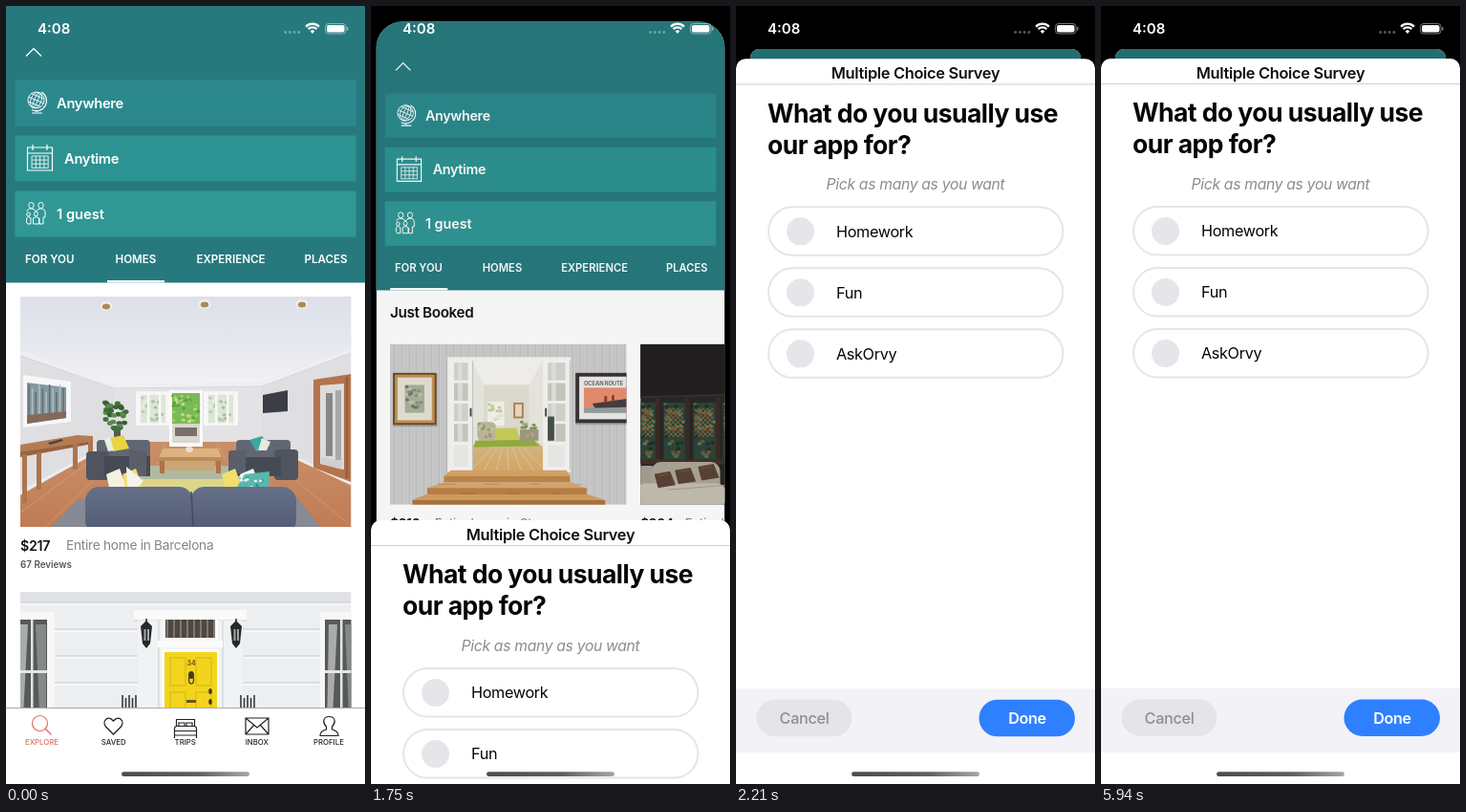
Recreate the animation shown at these times as an HTML page with a canvas. Size 376 px wide and 814 px high, loop 5980 ms.

```html
<!DOCTYPE html>
<html lang="en">
<head>
<meta charset="utf-8">
<title>Survey sheet</title>
<style>
html, body { margin: 0; width: 100%; height: 100%; overflow: hidden; background: #000; }
canvas { display: block; width: 376px; height: 814px; }
</style>
</head>
<body>
<canvas id="stage"></canvas>
<script>
const W = 376, H = 814, LOOP = 5980;
const TAB_TIME = 800, SHEET_TIME = 1684, SETTLED = 2190, SHEET_TOP = 55;
const canvas = document.getElementById('stage');
const ctx = canvas.getContext('2d');
const dpr = window.devicePixelRatio || 1;
canvas.width = W * dpr;
canvas.height = H * dpr;

const mix = (a, b, p) => a + (b - a) * p;
const clamp = v => Math.max(0, Math.min(1, v));

function rect(x, y, w, h, fill) {
  ctx.fillStyle = fill;
  ctx.fillRect(x, y, w, h);
}

function poly(fill, ...p) {
  ctx.beginPath();
  for (let i = 0; i < p.length; i += 2) ctx.lineTo(p[i], p[i + 1]);
  ctx.closePath();
  ctx.fillStyle = fill;
  ctx.fill();
}

function line(color, width, ...p) {
  ctx.beginPath();
  for (let i = 0; i < p.length; i += 2) ctx.lineTo(p[i], p[i + 1]);
  ctx.strokeStyle = color;
  ctx.lineWidth = width;
  ctx.stroke();
}

function oval(x, y, rx, ry, fill) {
  ctx.beginPath();
  ctx.ellipse(x, y, rx, ry, 0, 0, Math.PI * 2);
  ctx.fillStyle = fill;
  ctx.fill();
}

function ring(x, y, rx, ry, color, width = 1, tilt = 0) {
  ctx.beginPath();
  ctx.ellipse(x, y, rx, ry, tilt, 0, Math.PI * 2);
  ctx.strokeStyle = color;
  ctx.lineWidth = width;
  ctx.stroke();
}

function round(x, y, w, h, r, fill) {
  ctx.beginPath();
  ctx.roundRect(x, y, w, h, r);
  ctx.fillStyle = fill;
  ctx.fill();
}

function path(d, color, width) {
  ctx.strokeStyle = color;
  ctx.lineWidth = width;
  ctx.stroke(new Path2D(d));
}

function shade(y0, y1, ...colors) {
  const g = ctx.createLinearGradient(0, y0, 0, y1);
  colors.forEach((c, i) => g.addColorStop(i / (colors.length - 1), c));
  return g;
}

// y is the middle of the capitals
function text(s, x, y, size, weight, color, align = 'left', track = -0.02) {
  ctx.font = `${weight} ${size}px Inter, "Liberation Sans", sans-serif`;
  ctx.letterSpacing = size * track + 'px';
  ctx.textAlign = align;
  ctx.fillStyle = color;
  ctx.fillText(s, x, y + size * 0.364);
}

function photo(x, y, w, h, draw) {
  ctx.save();
  ctx.translate(x, y);
  ctx.beginPath();
  ctx.rect(0, 0, w, h);
  ctx.clip();
  draw(w, h);
  ctx.restore();
}

function leaves(x, y, w, h, n, colors, size = 2) {
  for (let i = 0; i < n; i++) {
    const a = Math.sin(i * 12.99) * 43758.5, b = Math.sin(i * 78.23) * 12543.7;
    oval(x + (a - Math.floor(a)) * w, y + (b - Math.floor(b)) * h, size, size * 0.8, colors[i % colors.length]);
  }
}

// Photos, each in its own coordinates

function lounge(w, h) {
  rect(0, 0, w, h, '#dfdee1');
  poly(shade(0, 95, '#dee0e9', '#e6e8ef', '#f2f2f5'), 0, 0, w, 0, w, 54, 253, 90, 98, 92, 0, 57);
  rect(98, 92, 155, 64, '#e3e2e4');
  line('#efeff3', 4, 0, 59, 98, 94, 253, 92, w, 56);
  line('#d3d3d8', 0.8, 0, 62, 98, 96, 253, 94, w, 59);
  for (const [x, y] of [[90, 10], [193, 8], [295, 8]]) {
    oval(x, y, 6, 4.5, '#f8f3e6');
    oval(x, y + 0.5, 4.2, 3, '#a98a5d');
  }
  poly(shade(152, h, '#c98f69', '#c07c54'), 0, 208, 98, 152, 253, 152, w, 196, w, h, 0, h);
  for (let i = 0; i < 9; i++) line('rgba(232,175,135,.45)', 1, 98 + i * 18, 154, i * 46 - 20, h);
  line('#ececee', 3, 0, 205, 98, 152);
  line('#ececee', 3, 253, 152, w, 196);
  for (const x of [122, 193]) {
    rect(x - 1, 99, 36, 36, '#f4f4f4');
    rect(x + 4, 103, 26, 29, '#dde5d6');
    leaves(x + 6, 106, 22, 24, 22, ['#bccfac', '#e6ece1', '#a9bf9e']);
    for (const d of [0, 11, 23, 32]) rect(x + d, 100, 2.5, 35, '#f8f8f8');
  }
  rect(156, 98, 35, 59, '#fafafa');
  rect(159, 101, 29, 34, '#7ab956');
  leaves(160, 104, 27, 28, 46, ['#5ca046', '#9bd25f', '#80bc54', '#c0df8c']);
  rect(159, 133, 29, 20, '#dad7d1');
  rect(162, 137, 23, 9, '#77716a');
  poly('#f7f7f9', 3, 82, 53, 89, 53, 131, 3, 137);
  poly('#8298a3', 7, 90, 48, 95, 48, 127, 7, 133);
  for (let i = 0; i < 11; i++) line(i % 2 ? '#b0c1c6' : '#6d675f', 1.4, 9 + i * 3.6, 92 + i % 3 * 4, 9 + i * 3.6, 126);
  poly('#826b58', 7, 124, 48, 120, 48, 127, 7, 133);
  poly('#b47c50', 0, 155, 60, 145, 76, 146, 76, 151, 0, 164);
  poly('#966240', 0, 163, 76, 151, 76, 154, 0, 168);
  for (const [x, y, e] of [[2, 165, 216], [17, 163, 202], [55, 154, 181], [71, 152, 179]]) rect(x, y, 5, e - y, '#ad7550');
  poly('#4b4441', 29, 153, 43, 149, 45, 151, 31, 155);
  rect(98, 135, 7, 15, '#5c5754');
  leaves(89, 111, 22, 29, 34, ['#416f3c', '#5b8c4f', '#345f32'], 3);
  poly('#3c3e45', 254, 103, 280, 98, 280, 120, 254, 122);
  poly('#b4744c', 307, 87, w, 81, w, 194, 307, 179);
  poly('#dcdcdb', 314, 93, 339, 91, 339, 181, 314, 175);
  rect(320, 101, 7, 66, '#858889');
  rect(330, 98, 6, 73, '#a6a9aa');
  line('#96603f', 3, 342, 84, 342, 190);
  poly('#cfd0ce', 315, 175, 337, 181, 337, 172, 315, 168);

  const dark = '#50545f';
  poly('#b0b99f', 136, 177, 217, 177, 245, 202, 110, 202);
  round(80, 150, 56, 27, 4, '#626672');
  round(69, 162, 24, 30, 4, dark);
  rect(88, 167, 48, 21, '#464a55');
  round(114, 161, 18, 27, 3, '#5b5f6a');
  round(226, 150, 57, 27, 4, '#626672');
  round(266, 160, 25, 32, 4, dark);
  rect(225, 168, 48, 20, '#464a55');
  round(218, 161, 18, 24, 3, '#5b5f6a');
  poly('#ead43f', 93, 148, 108, 145, 114, 159, 97, 162);
  poly('#e7eee4', 88, 150, 94, 147, 98, 161, 92, 162);
  poly('#3aa8a0', 240, 150, 253, 146, 262, 156, 247, 162);
  poly('#e6eadb', 253, 148, 262, 152, 258, 161, 249, 161);
  poly('#dcb380', 149, 159, 207, 159, 211, 169, 145, 169);
  rect(145, 168, 66, 5, '#be8a58');
  for (const x of [146, 205]) rect(x, 172, 5, 13, '#a97549');
  rect(151, 172, 53, 10, '#cba678');
  oval(177, 160, 4, 3, '#e6dfd6');
  poly('#858a95', 61, 212, 288, 208, 314, h, 33, h);
  round(99, 191, 151, 18, 7, '#ddd68a');
  for (const [x, c] of [[90, '#f4f1de'], [107, '#efdf6d'], [211, '#efdf6d'], [230, '#effaf5']]) {
    poly(c, x, 186, x + 14, 180, x + 22, 202, x + 4, 204);
  }
  poly('#f5f4ec', 111, 178, 129, 193, 121, 202, 112, 198);
  poly('#58b8ae', 235, 186, 261, 183, 260, 201, 224, 204);
  leaves(231, 188, 25, 12, 13, ['#e6f2e8', '#34988f'], 1.7);
  const cloth = shade(198, h, '#667089', '#545e76');
  round(68, 199, 113, 50, 15, cloth);
  round(178, 199, 111, 50, 15, cloth);
  line('#434c63', 1.5, 179, 204, 181, h);
}

function facade(w, h) {
  rect(0, 0, w, h, '#edeef0');
  rect(0, 0, w, 11, '#e0e2e5');
  for (let y = 11; y < h; y += 28) {
    line('#cbced2', 1.2, 0, y, w, y);
    line('#f8f9fa', 1.5, 0, y + 2, w, y + 2);
  }
  for (const x of [-10, 314]) {
    rect(x, 21, 46, h, '#f7f7f7');
    rect(x + 5, 29, 33, h, '#565a5b');
    poly('#a9acab', x + 9, 34, x + 18, 34, x + 12, h, x + 7, h);
    poly('#858989', x + 26, 34, x + 37, 34, x + 37, h, x + 31, h);
    rect(x + 21, 29, 2.5, h, '#e4e5e4');
    rect(x + 5, 82, 33, 3, '#e4e5e4');
  }
  rect(119, 19, 118, 11, '#fafafa');
  line('#c6c9cd', 1, 119, 30, 237, 30);
  rect(123, 30, 110, h, '#f1f2f3');
  line('#cbced1', 1, 145, 30, 145, h);
  line('#cbced1', 1, 212, 30, 212, h);
  rect(149, 27, 58, 24, '#fafafa');
  rect(152, 29, 52, 19, '#4e4843');
  for (let i = 0; i < 8; i++) line('#b1a69b', 1, 154 + i * 7, 29, 154 + i * 7, 48);
  rect(144, 51, 68, 7, '#fbfbfb');
  rect(148, 60, 60, h, '#fdfdfd');
  rect(151, 63, 55, h, '#f2d41c');
  ctx.strokeStyle = '#d9ba1a';
  ctx.lineWidth = 1.2;
  for (const x of [157, 184]) {
    ctx.strokeRect(x, 69, 16, 29);
    ctx.strokeRect(x, 105, 16, 40);
  }
  text('34', 179, 74, 7, 600, '#5d4b13', 'center', 0);
  oval(179, 87, 3, 4, '#493c20');
  ring(179, 92, 2.5, 4, '#493c20', 1.3);
  rect(174, 113, 10, 3, '#6a5415');
  oval(199, 104, 1.8, 3, '#493c20');
  oval(199, 115, 1.8, 3, '#493c20');
  for (const x of [132, 226]) {
    line('#26282a', 1.5, x, 28, x, 34);
    poly('#26282a', x - 6, 36, x, 30, x + 6, 36, x + 4, 54, x, 59, x - 4, 54);
    rect(x - 2.5, 39, 2, 12, '#a4a7a8');
    rect(x + 1, 39, 2, 12, '#a4a7a8');
  }
  for (const x of [107, 231]) for (let i = 0; i < 5; i++) line('#35383a', 1.6, x + i * 3.5, 108 + i % 2 * 3, x + i * 3.5, h);
}

function hall(w, h) {
  rect(0, 0, w, h, '#cecdcd');
  for (let x = 5; x < w; x += 8) {
    line('#bdbcbd', 0.8, x, 0, x, h);
    line('#d7d6d6', 0.8, x + 1.2, 0, x + 1.2, h);
  }
  rect(62, 14, 133, 124, '#f6f6f4');
  rect(88, 17, 77, 120, '#ecebe4');
  poly('#f7f6f2', 88, 17, 165, 17, 150, 44, 101, 44);
  rect(101, 44, 49, 55, '#e4e1d4');
  rect(105, 62, 18, 26, '#f8f8ef');
  leaves(107, 65, 14, 17, 18, ['#c4d2a6', '#e6ebd2']);
  rect(133, 63, 11, 17, '#b3855b');
  rect(135, 65, 7, 13, '#ede1c2');
  poly(shade(98, 138, '#dcc18f', '#d9ac6c'), 88, 111, 101, 98, 150, 98, 165, 111, 165, 138, 88, 138);
  for (let i = 0; i < 7; i++) line('rgba(244,218,168,.6)', 1, 117 + i * 3, 103, 86 + i * 14, 138);
  poly('#93b33f', 92, 104, 154, 103, 161, 110, 90, 111);
  round(94, 84, 20, 20, 5, '#bfbb9e');
  leaves(96, 86, 17, 15, 14, ['#8ca66a', '#d4cb9f', '#a7997a'], 1.8);
  poly('#c9d25c', 114, 91, 137, 90, 139, 102, 114, 103);
  rect(140, 92, 20, 12, '#a29c83');
  leaves(142, 84, 17, 16, 16, ['#7d9658', '#b1ae87']);
  for (const [x, pw] of [[64, 25], [165, 29]]) {
    rect(x, 16, pw, 121, '#f8f8f7');
    for (let i = 0; i < 4; i++) {
      rect(x + 5, 20 + i * 22, pw - 10, 19, i % 2 ? '#cbcbc2' : '#d6d6d0');
      rect(x + 9, 20 + i * 22, 5, 19, '#e4e4df');
    }
    rect(x + 5, 109, pw - 10, 23, '#eeeeec');
    line('#c6c6c3', 1, x + pw, 18, x + pw, 135);
  }
  rect(170, 78, 7, 26, '#4a534a');
  rect(86, 69, 2, 9, '#4f4a43');
  rect(167, 69, 2, 9, '#4f4a43');
  const wood = ['#d9a667', '#c2874a', '#dcaa6c', '#bd8145', '#d69f62'];
  poly(wood[0], 66, 136, 190, 136, 194, 142, 58, 142);
  rect(58, 142, 136, 7, wood[1]);
  poly(wood[2], 57, 149, 196, 149, 211, 155, 40, 155);
  rect(40, 155, 172, 7, wood[3]);
  poly(wood[4], 39, 162, 213, 162, 231, 168, 24, 168);
  rect(24, 168, 208, 6, '#b07640');
  for (let i = 0; i < 7; i++) line('rgba(115,67,28,.3)', 0.8, 51 + i * 25, 151 + i % 2 * 10, 70 + i * 23, 151 + i % 2 * 10);
  rect(3, 32, 48, 57, 'rgba(80,75,75,.3)');
  rect(3, 31, 47, 56, '#6e4b27');
  rect(5, 33, 43, 52, '#c49552');
  rect(8, 36, 37, 46, '#e9e3d6');
  rect(16, 44, 21, 30, '#a9b29b');
  leaves(18, 46, 17, 23, 24, ['#637e60', '#cfc6a8', '#88927e']);
  rect(200, 32, 56, 55, 'rgba(80,75,75,.3)');
  rect(200, 31, 56, 54, '#393437');
  rect(204, 35, 52, 46, '#eeece8');
  text('OCEAN ROUTE', 209, 42, 6, 700, '#6b676e');
  rect(209, 47, 46, 27, '#e99070');
  poly('#473e43', 218, 64, 255, 59, 255, 68, 221, 69);
  rect(231, 56, 3, 7, '#903f35');
  rect(239, 55, 3, 7, '#903f35');
  rect(209, 69, 46, 5, '#8aa5aa');
}

function cabin(w, h) {
  rect(0, 0, w, h, '#2a2626');
  poly('#221f20', 0, 0, w, 0, w, 51, 0, 58);
  line('#3b322e', 2, 0, 57, w, 51);
  for (const [x, ww] of [[0, 17], [25, 24], [57, 25], [89, 26]]) {
    rect(x, 63, ww, 62, '#2e4539');
    leaves(x + 2, 65, ww - 4, 57, 34, ['#4b6d4c', '#1e3029', '#5f7c66', '#6f5a38'], 2.2);
    ctx.save();
    ctx.beginPath();
    ctx.rect(x + 1, 67, ww - 4, 34);
    ctx.clip();
    for (let i = -20; i < ww + 20; i += 5) {
      line('#95683a', 1, x + i, 69, x + i + 31, 100);
      line('#95683a', 1, x + i + 31, 69, x + i, 100);
    }
    ctx.restore();
    rect(x + ww - 1, 58, 5, 74, '#3a2c27');
  }
  rect(0, 124, w, 5, '#40322a');
  round(-6, 131, 26, 30, 9, '#a79f92');
  round(12, 127, 74, 42, 10, '#aea698');
  round(-4, 150, 96, 26, 9, '#c6bfb2');
  for (const [x, y] of [[26, 146], [48, 142], [73, 138]]) {
    poly('#5b4436', x - 11, y - 6, x + 6, y - 9, x + 12, y + 6, x - 7, y + 9);
    line('#735846', 1, x - 7, y - 4, x + 4, y - 6);
  }
  line('#a39b8e', 1, 30, 157, 92, 152);
}

// App screen

function stars(x, y) {
  for (let s = 0; s < 5; s++) {
    ctx.beginPath();
    for (let i = 0; i < 10; i++) {
      const a = -Math.PI / 2 + i * Math.PI / 5, r = i % 2 ? 2.3 : 5.6;
      ctx.lineTo(x + 5.5 + s * 11.5 + Math.cos(a) * r, y + Math.sin(a) * r);
    }
    ctx.fillStyle = '#3ba7a0';
    ctx.fill();
  }
}

function caption(x, y, price, place) {
  text(price, x, y, 14.2, 600, '#111');
  text(place, x + 48, y, 13.7, 400, '#858585');
}

function reviews(s, x, y) {
  text(s, x, y, 9.8, 600, '#555', 'left', 0);
}

function homesPage() {
  photo(15, 304, 346.5, 241, lounge);
  caption(15, 564.5, '$217', 'Entire home in Barcelona');
  reviews('67 Reviews', 15, 584);
  photo(15, 613, 346.5, 150, facade);
}

function forYouPage() {
  text('Just Booked', 15, 313.5, 15.6, 600, '#111');
  text('Homes', 15, 603, 15.6, 600, '#111');
  for (const y of [347.5, 637]) {
    photo(15, y, 255, 173, hall);
    photo(285, y, 255, 173, cabin);
  }
  caption(15, 540.5, '$216', 'Entire home in Stavanger');
  caption(285, 540.5, '$204', 'Entire home in Lisbon');
  stars(15, 560);
  stars(285, 560);
  reviews('220 Reviews', 77, 560);
  reviews('181 Reviews', 347, 560);
}

function searchIcons() {
  const c = '#fff', tilt = 0.4;
  for (const r of [8.5, 5.5, 1.8]) ring(31.5, 98.5, r, 8.5, c, 0.9, tilt);
  for (const d of [-4.5, 0, 4.5]) {
    const half = Math.sqrt(72 - d * d), cos = Math.cos(tilt), sin = Math.sin(tilt);
    line(c, 0.9, 31.5 - half * cos - d * sin, 98.5 - half * sin + d * cos,
      31.5 + half * cos - d * sin, 98.5 + half * sin + d * cos);
  }
  path('M37 90 A10.5 10.5 0 0 1 27 108.5 M32 109 V111 M27 112 H38', c, 1.2);

  path('M22.5 148 H48.5 V172 H22.5 Z M22.5 154 H48.5 M28 145 V151 M43 145 V151', c, 1.2);
  for (let i = 0; i < 5; i++) line(c, 0.8, 27 + i * 4.3, 157, 27 + i * 4.3, 169.5);
  for (let i = 0; i < 4; i++) line(c, 0.8, 27, 157 + i * 4.1, 44.2, 157 + i * 4.1);

  ring(26.5, 208.5, 2.7, 3, c);
  ring(36.5, 208.5, 2.7, 3, c);
  ring(23.5, 218, 1.8, 2, c);
  ring(31.5, 217.5, 2, 2.2, c);
  path('M22 215 Q22 212 26.5 212 Q30 212 31.5 215 Q33 212 36.5 212 Q41 212 41 216 V221 H39 V228 H35 V222'
    + ' M21.5 226 V222 Q23.5 219 26 222 V228 H22.5 Z M28.5 228 V222 Q31.5 219 34.5 222 V228 Z', c, 1);
}

function tabBar() {
  rect(0, 734, W, 80, '#fff');
  rect(0, 734, W, 1, '#a9a9a9');
  const red = '#dc6f5d', ink = '#222';
  ring(35.5, 750.5, 8, 8, red, 1.2);
  line(red, 1.3, 41.3, 756.2, 47.5, 762.5);
  path('M112.5 762 L104.5 754 C100 748 107 741.5 112.5 748 C118 741.5 125 748 120.5 754 Z', ink, 1.3);
  path('M178.5 754 V746.5 H197.5 V754 M176.5 766 V756 Q176.5 753.5 179 753.5 H197 Q199.5 753.5 199.5 756 V766'
    + ' M176.5 758.5 H199.5 M176.5 763 H199.5 M181 753 V750 H187 V753 M189 753 V750 H195 V753', ink, 1.2);
  path('M251 745 H275 V762 H251 Z L263 755 L275 745 M251 762 L259.5 752.5 M275 762 L266.5 752.5', ink, 1.2);
  path('M335.5 754 C331.5 750 331.5 743.5 338.5 743.5 C345.5 743.5 345.5 750 341.5 754'
    + ' V757 Q348 758.5 348 763.5 H329 Q329 758.5 335.5 757 Z', ink, 1.2);
  ['EXPLORE', 'SAVED', 'TRIPS', 'INBOX', 'PROFILE'].forEach((s, i) =>
    text(s, 37.5 + i * 75.1, 770, 7.8, 500, i ? ink : red, 'center', 0));
}

function screen(t) {
  rect(0, 0, W, H, '#fff');
  if (t < TAB_TIME) homesPage(); else forYouPage();
  rect(0, 0, W, 289.5, '#267a7e');
  path('M21 52.5 L29 44.5 L37 52.5', '#fff', 1.3);
  ['#2b898e', '#2d9392', '#309795'].forEach((c, i) => rect(9.5, 77.5 + i * 58, 357, 48, c));
  searchIcons();
  text('Anywhere', 53, 101.5, 14.7, 600, '#fff');
  text('Anytime', 61, 159.5, 14.7, 600, '#fff');
  text('1 guest', 53, 217.5, 14.7, 600, '#fff', 'left', 0);
  const tabs = { 'FOR YOU': 20, HOMES: 114.5, EXPERIENCE: 199.5, PLACES: 312.5 };
  for (const s in tabs) text(s, tabs[s], 265, 11.6, 600, '#fff', 'left', 0);
  const k = 1 - (1 - clamp((t - TAB_TIME) / 150)) ** 3;
  rect(mix(106, 15, k), 287, mix(60, 62, k), 2.5, '#fff');
  tabBar();
}

function statusBar() {
  text('4:08', 33, 24, 15, 600, '#fff', 'left', 0);
  for (let i = 0; i < 4; i++) oval(292.7 + i * 4.7, 27.5, 1.4, 1.4, 'rgba(255,255,255,.35)');
  ctx.strokeStyle = '#fff';
  ctx.lineWidth = 2.3;
  for (const r of [9.8, 6.2]) {
    ctx.beginPath();
    ctx.arc(321, 28.5, r, -Math.PI * 0.75, -Math.PI * 0.25);
    ctx.stroke();
  }
  poly('#fff', 318.6, 26.3, 321, 25, 323.4, 26.3, 321, 29);
  ctx.beginPath();
  ctx.roundRect(334.5, 18.5, 21.5, 10.5, 3.2);
  ctx.strokeStyle = 'rgba(255,255,255,.45)';
  ctx.lineWidth = 1;
  ctx.stroke();
  round(336, 20, 18.5, 7.5, 2, '#fff');
  round(357, 21.8, 1.4, 4, 0.7, 'rgba(255,255,255,.5)');
}

function sheet(top, moving) {
  ctx.save();
  ctx.translate(0, top);
  const low = moving ? 39 : 0;
  round(0, 0, W, H - SHEET_TOP, [10, 10, low, low], '#fff');
  ctx.clip();
  text('Multiple Choice Survey', W / 2, 15, 16.4, 600, '#111', 'center');
  rect(0, 26, W, 1, '#cfcfd1');
  text('What do you usually use', 33, 56.5, 26.5, 700, '#050505');
  text('our app for?', 33, 89.5, 26.5, 700, '#050505');
  text('Pick as many as you want', W / 2, 131, 15.7, 'italic 400', '#8c8c91', 'center');
  ['Homework', 'Fun', 'AskOrvy'].forEach((s, i) => {
    const y = 155 + i * 64;
    ctx.beginPath();
    ctx.roundRect(34, y, 308.5, 50.5, 25.25);
    ctx.strokeStyle = '#e5e5ea';
    ctx.lineWidth = 2;
    ctx.stroke();
    oval(67.5, y + 25.5, 14.5, 14.5, '#e5e5ea');
    text(s, 105, y + 25.5, 16.2, 400, '#050505');
  });
  rect(0, 659, W, 67, '#f2f2f7');
  round(21.5, 670.5, 100, 38.5, 19.25, '#e5e5e8');
  text('Cancel', 71.5, 690, 16.2, 500, '#8e8e92', 'center');
  round(254.5, 670.5, 100.5, 38.5, 19.25, '#2f80ff');
  text('Done', 305, 690, 16.2, 600, '#fff', 'center');
  ctx.restore();
}

function homeBar() {
  const g = ctx.createLinearGradient(121, 0, 255, 0);
  g.addColorStop(0, '#4c4c4c');
  g.addColorStop(0.6, '#606060');
  g.addColorStop(1, '#a6a6a6');
  round(121, 801.3, 134, 4.8, 2.4, g);
}

function draw(t) {
  ctx.setTransform(dpr, 0, 0, dpr, 0, 0);
  // Critically damped spring
  const s = Math.max(0, t - SHEET_TIME) / 1000 * 19;
  const p = t > 2540 ? 1 : 1 - (1 + s) * Math.exp(-s);
  if (!p) {
    screen(t);
  } else {
    rect(0, 0, W, H, '#000');
    const k = mix(1, 0.92, p);
    ctx.save();
    ctx.translate(W / 2 * (1 - k), 45 * p);
    ctx.scale(k, k);
    ctx.beginPath();
    ctx.roundRect(0, 0, W, H, mix(39, 10, p));
    ctx.clip();
    screen(t);
    rect(0, 0, W, H, `rgba(0,0,0,${0.11 * p})`);
    ctx.restore();
    sheet(mix(H, SHEET_TOP, p), t < SETTLED);
  }
  statusBar();
  homeBar();
}

const start = performance.now();
function tick() {
  draw((performance.now() - start) % LOOP);
  requestAnimationFrame(tick);
}
tick();
</script>
</body>
</html>
```
